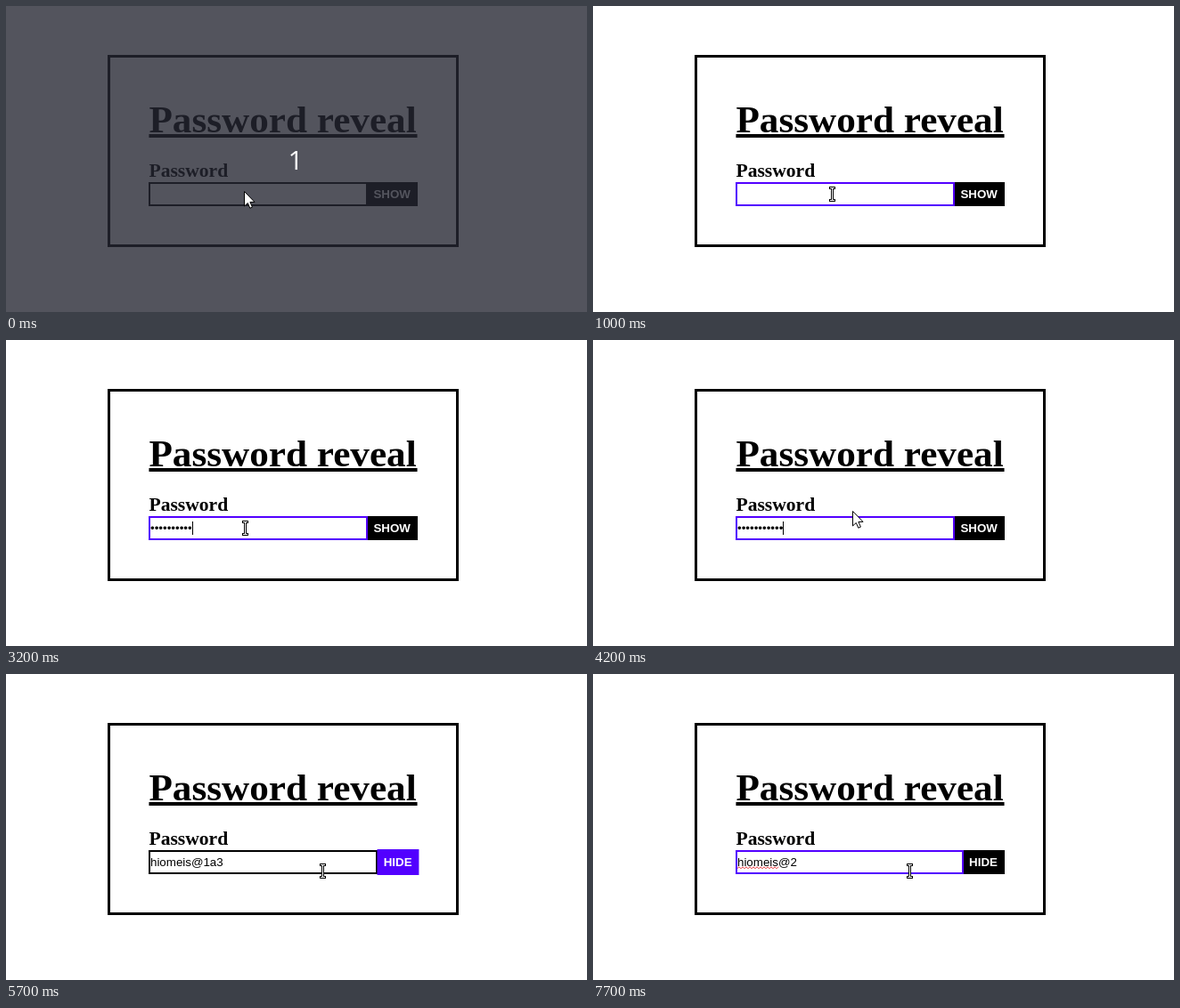
An HTML page that plays this animation: 652x344 px, repeating every 8 s.

```html
<!DOCTYPE html>
<html lang="en">
<head>
<meta charset="utf-8">
<title>Password reveal</title>
<style>
  html, body { margin: 0; width: 100%; height: 100%; overflow: hidden; background: #fff; }
  svg { display: block; }
  .serif { font-family: "Liberation Serif", "Times New Roman", serif; font-weight: bold; }
  .sans { font-family: "Liberation Sans", Arial, sans-serif; font-size: 13.333px; }
</style>
</head>
<body>
<svg width="652" height="344" viewBox="0 0 652 344">
  <rect width="652" height="344" fill="#fff"/>
  <rect x="115.5" y="56.5" width="391" height="213" fill="none" stroke="#000" stroke-width="3"/>
  <text class="serif" x="160.45" y="142" font-size="43.2">Password reveal</text>
  <rect x="160.45" y="144" width="301.1" height="4"/>
  <text class="serif" x="160.45" y="192" font-size="21.6">Password</text>

  <rect id="field" x="161" y="199" height="25" fill="#fff" stroke-width="2"/>
  <rect id="button"/>
  <text id="label" class="sans" y="216" font-weight="bold" fill="#fff" text-anchor="middle"></text>
  <path id="squiggle" fill="none" stroke="#e8383d" stroke-width="1"/>
  <text id="value" class="sans" x="162" y="216"></text>
  <rect id="caret" y="204" width="1" height="15"/>

  <g id="overlay">
    <rect width="652" height="344" fill="#252732" fill-opacity=".79"/>
    <text x="325" y="184" font-size="30" fill="#fff" text-anchor="middle"
          font-family="Open Sans, Noto Sans, sans-serif">1</text>
  </g>

  <g id="arrow">
    <path d="M.5 .5V17L4.3 13.5L6.8 19.3L9.4 18.1L6.9 12.4H12Z" fill="#fff" stroke="#000"/>
  </g>
  <g id="beam">
    <path d="M-3-8H4V-5H2V6H4V9H-3V6H-1V-5H-3Z"/>
    <path d="M-2-7H3V-6H1V7H3V8H-2V7H0V-6H-2Z" fill="#fff"/>
  </g>
  <g id="hand">
    <path d="M-.5 9V1Q1 -1 2.5 1V6Q4 4.6 5.3 6.2Q7 5 8 6.8Q10.2 6 10.2 8V11.5L8.6 15.5H.6L-4.4 9.6Q-4.4 7.4 -2.4 8Z"
          fill="#fff" stroke="#000"/>
    <path d="M2.5 6V9M5.3 6.4V9M8 7V9" fill="none" stroke="#000"/>
  </g>
</svg>
<script>
const LOOP = 8000, STEP = 100;
const PURPLE = "#5200ff";
const $ = id => document.getElementById(id);
const set = (id, attrs) => {
  for (const k in attrs) $(id).setAttribute(k, attrs[k]);
};
const show = (id, on) => set(id, { visibility: on ? "visible" : "hidden" });

const dots = n => "•".repeat(n);

// time, field text, caret visible
const typing = [
  [0, "", 0], [500, "", 1], [1000, "", 0], [1100, dots(1), 1],
  [1300, dots(3), 1], [1400, dots(5), 1], [2100, dots(5), 0],
  [2200, dots(7), 1], [2700, dots(8), 1], [2900, dots(9), 1],
  [3200, dots(10), 1], [3800, dots(10), 0], [4000, dots(11), 1],
  [4500, dots(11), 0], [4800, "hiomeis@1a3", 0], [6500, "hiomeis@1a3", 1],
  [6900, "hiomeis@1", 1], [7000, "hiomeis@", 1], [7200, "hiomeis@2", 1],
  [7700, "hiomeis@2", 0]
];

// time, pointer x, pointer y
const moves = [
  [0, 267, 208], [100, 270, 211], [200, 270, 211], [300, 268, 211],
  [4100, 268, 211], [4200, 291, 192], [4300, 335, 181], [4400, 385, 184],
  [4500, 425, 200], [4600, 433, 207], [4700, 434, 208], [4800, 433, 208],
  [4900, 432, 207], [5000, 435, 205], [5100, 435, 205], [5200, 425, 210],
  [5300, 405, 214], [5500, 370, 221], [5600, 358, 222], [5700, 355, 221]
];

const lastAt = (list, t) => list.filter(row => row[0] <= t).pop();

function pointer(t) {
  const a = lastAt(moves, t);
  const b = moves.find(row => row[0] > t) || a;
  const k = b === a ? 0 : (t - a[0]) / (b[0] - a[0]);
  return [1, 2].map(i => Math.round(a[i] + (b[i] - a[i]) * k));
}

let wave = "M162 218.5";
for (let x = 164, up = true; x <= 208; x += 2, up = !up) wave += `L${x} ${up ? 216.8 : 218.8}`;
set("squiggle", { d: wave });

function draw(time) {
  const t = Math.floor(time / STEP) * STEP;
  const [, text, caret] = lastAt(typing, t);
  const [x, y] = pointer(t);
  const revealed = t >= 4800;
  const typingNow = (t >= 500 && t < 4700) || t >= 6500;
  const left = revealed ? 416 : 406;
  const onButton = x >= left && x < 462 && y >= 198 && y < 225;
  const onField = x >= 160 && x < left && y >= 198 && y < 225;
  const active = onButton || (t >= 4700 && t < 6500);

  const right = revealed && active ? left + 1 : left;
  set("field", { width: right - 162, stroke: typingNow ? PURPLE : "#000" });
  set("button", active
    ? { x: left + .5, y: 197, width: 462.9 - left, height: 29, fill: PURPLE }
    : { x: left, y: 198, width: 462 - left, height: 27, fill: "#000" });
  $("label").textContent = revealed ? "HIDE" : "SHOW";
  set("label", { x: (revealed ? 438 : 433.2) + (active ? 1.6 : 0) });

  $("value").textContent = text;
  set("caret", { x: Math.round(162 + $("value").getComputedTextLength()) });
  show("caret", caret);
  show("squiggle", t >= 6500);
  show("overlay", t < 100);

  const kind = t < 100 ? "arrow" : onButton ? "hand" : onField ? "beam" : "arrow";
  for (const id of ["arrow", "beam", "hand"]) show(id, id === kind);
  set(kind, { transform: `translate(${x} ${y})` });
}

const start = performance.now();
function tick(now) {
  draw(Math.max(0, now - start) % LOOP);
  requestAnimationFrame(tick);
}
draw(0);
requestAnimationFrame(tick);
</script>
</body>
</html>
```
